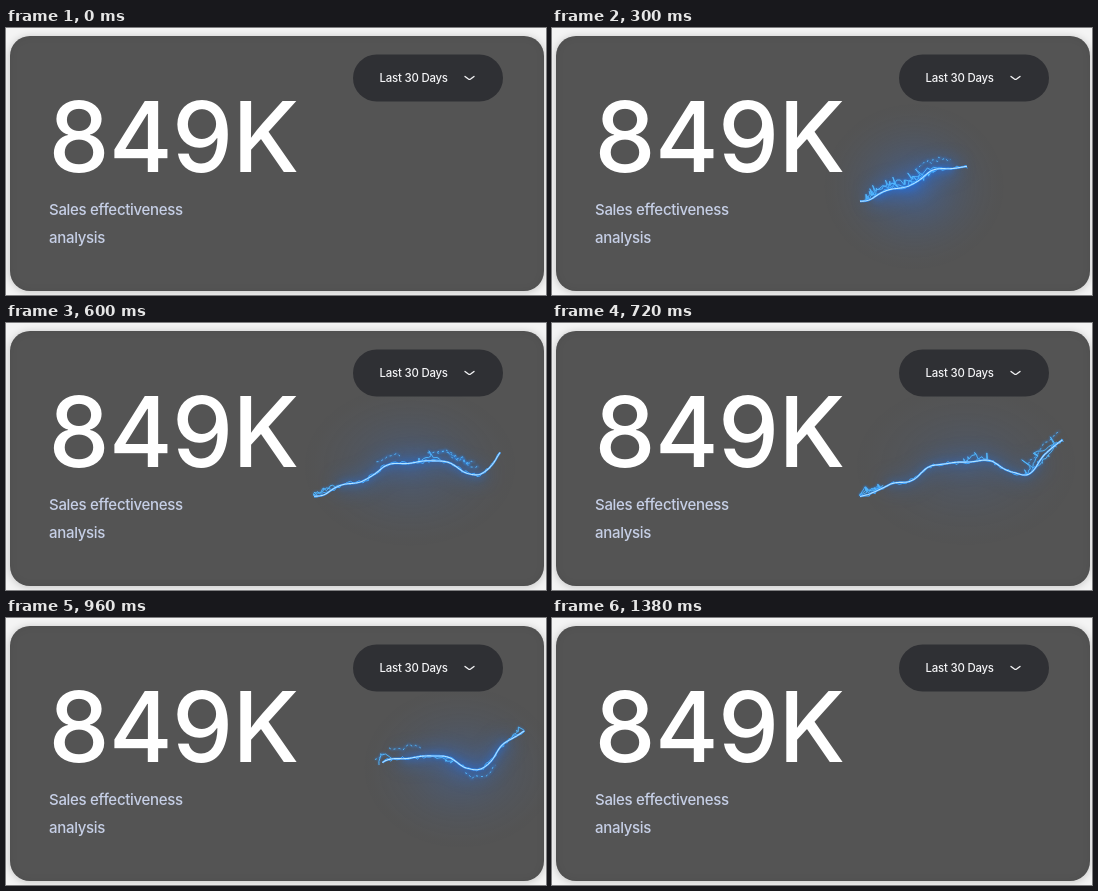
An HTML page with a canvas for the animation above (1800 ms loop, 540x267 px).

```html
<!DOCTYPE html>
<html lang="en">
<head>
<meta charset="utf-8">
<title>Sales effectiveness</title>
<style>
  html, body { margin: 0; width: 100%; height: 100%; overflow: hidden; background: #f4f4f4; }
  .stage { position: relative; width: 540px; height: 267px; overflow: hidden; }
  .card {
    position: absolute; left: 3.5px; top: 8px; width: 534px; height: 255px;
    border-radius: 20px; background: #545454; overflow: hidden;
    box-shadow: 0 1px 8px rgba(0, 0, 0, .2), inset 0 0 8px rgba(0, 0, 0, .07);
  }
  canvas { position: absolute; left: -3.5px; top: -8px; }
  svg { position: absolute; inset: 0; font: 500 15px Inter, sans-serif; }
  .total { font-size: 97px; letter-spacing: -.6px; fill: #fff; }
  .label { letter-spacing: -.3px; fill: #c6cfe6; }
  .range { font-size: 11.4px; letter-spacing: -.2px; fill: #f4f4f6; }
</style>
</head>
<body>
<div class="stage">
  <div class="card"><canvas width="540" height="267"></canvas></div>
  <svg width="540" height="267" viewBox="0 0 540 267">
    <rect x="347" y="26.5" width="150" height="47" rx="23.5" fill="#2f3034"/>
    <text class="range" x="373.5" y="54">Last 30 Days</text>
    <path d="M459 48.4L462.4 51Q463.5 51.8 464.6 51L468 48.4" fill="none" stroke="#f4f4f6" stroke-width="1.3" stroke-linecap="round"/>
    <text class="total" x="42.5" y="143.5">849K</text>
    <text class="label" x="43" y="187">Sales effectiveness</text>
    <text class="label" x="43" y="215">analysis</text>
  </svg>
</div>
<script>
const LOOP = 1800, STEP = 30, END = 1380;
const ARC_EVERY = 30, ARC_LIFE = 210;
const ctx = document.querySelector('canvas').getContext('2d');

// key points of the chart line
const keys = [[308, 173], [319, 171], [338, 161], [357, 158.5], [380, 143], [410, 139.5],
  [437, 138], [462, 150], [477, 150.5], [499, 125], [519, 113]];
const line = sampleCurve(keys);
const total = line[line.length - 1].s;

function sampleCurve(p) {
  const last = p.length - 1, out = [];
  const slope = i => {
    const a = p[Math.max(i - 1, 0)], b = p[Math.min(i + 1, last)];
    return (b[1] - a[1]) / (b[0] - a[0]);
  };
  let s = 0;
  for (let i = 0; i < last; i++) {
    const [x0, y0] = p[i], [x1, y1] = p[i + 1], w = x1 - x0;
    for (let x = x0; x < x1; x += .5) {
      const u = (x - x0) / w, v = 1 - u;
      const y = v * v * ((1 + 2 * u) * y0 + u * w * slope(i)) +
                u * u * ((3 - 2 * u) * y1 - v * w * slope(i + 1));
      const prev = out[out.length - 1];
      if (prev) s += Math.hypot(x - prev.x, y - prev.y);
      out.push({ x, y, s });
    }
  }
  return out;
}

// point at distance s along the line, moved sideways by `lift`
function at(s, lift = 0) {
  let i = line.findIndex(p => p.s >= s);
  if (i < 0) i = line.length - 1;
  const p = line[i], a = line[Math.max(i - 2, 0)], b = line[Math.min(i + 2, line.length - 1)];
  const dx = b.x - a.x, dy = b.y - a.y, len = Math.hypot(dx, dy);
  return [p.x + dy / len * lift, p.y - dx / len * lift];
}

function random(seed) {
  let s = Math.imul(seed + 1, 2654435761);
  return () => {
    s = (s + 0x6D2B79F5) | 0;
    let r = Math.imul(s ^ s >>> 15, s | 1);
    r ^= r + Math.imul(r ^ r >>> 7, r | 61);
    return ((r ^ r >>> 14) >>> 0) / 4294967296;
  };
}

const clamp = u => Math.min(1, Math.max(0, u));
const headAt = t => total * Math.sin(Math.PI / 2 * clamp((t - 30) / 840));
const tailAt = t => total * clamp((t - 755) / 645);

function trace(from, to, step, lift) {
  const path = new Path2D();
  for (let s = from; s < to; s += step) path.lineTo(...at(s, lift(s)));
  path.lineTo(...at(to, lift(to)));
  return path;
}

function stroke(path, color, width, blur = 0, dash = []) {
  ctx.filter = blur ? `blur(${blur}px)` : 'none';
  ctx.strokeStyle = color;
  ctx.lineWidth = width;
  ctx.setLineDash(dash);
  ctx.stroke(path);
}

function drawGlow(tail, head, power) {
  const len = head - tail, [x, y] = at((tail + head) / 2);
  const halo = ctx.createRadialGradient(0, 0, 0, 0, 0, 85);
  for (let u = 0; u <= 1; u += .125) {
    halo.addColorStop(u, `rgba(45,115,230,${.42 * power * (1 - u) ** 2})`);
  }
  ctx.save();
  ctx.filter = 'none';
  ctx.translate(x, y + 3);
  ctx.scale(.8 + len / 400, 1);
  ctx.fillStyle = halo;
  ctx.fillRect(-90, -90, 180, 180);
  ctx.restore();

  const inset = len * .14;
  const middle = trace(tail + inset, head - inset, 2, () => 0);
  stroke(middle, `rgba(35,115,240,${.42 * power})`, 14, 9);
  stroke(middle, `rgba(25,120,255,${.6 * power})`, 5, 3.5);
}

// one discharge: born at a random spot on the visible line, it flickers for a short life
function drawArc(born, t, tail, head) {
  const own = random(born), rnd = random(born * 7 + t);
  const tailBorn = tailAt(born), headBorn = headAt(born);
  const mid = tailBorn + own() * (headBorn - tailBorn);
  const reach = 9 + own() * 14;
  const side = own() < .72 ? 1 : -.6;
  const tall = side * (6 + own() * 9);
  const floating = own() < .25;
  const from = Math.max(tail - 4, mid - reach), to = Math.min(head + 2, mid + reach);
  if (to - from < 4) return;

  const path = new Path2D();
  for (let s = from; s < to; s += 1.2 + rnd() * 3) {
    const swell = Math.sin(Math.PI * (s - from) / (to - from));
    const lift = tall * (floating ? .6 + rnd() * .5 : swell * (.15 + .55 * rnd()));
    path.lineTo(...at(s, lift));
    if (!floating && rnd() < .2) {
      path.lineTo(...at(s + rnd() * 3 - 1.5, lift + tall * .7 * rnd()));
      path.lineTo(...at(s + 1, lift));
    }
  }
  stroke(path, 'rgba(40,140,255,.35)', 2, 1.2);
  stroke(path, '#55bcff', .9, 0, floating ? [2, 3] : []);
}

function drawBolt(t) {
  ctx.clearRect(0, 0, 540, 267);
  if (t < STEP || t >= END) return;
  const tail = tailAt(t), head = Math.max(headAt(t), 4);
  const power = .7 + .3 * Math.cos(2 * Math.PI * (t - 350) / 820);
  const rnd = random(t);
  const phase = rnd() * 6;
  const main = trace(tail, head, 1, s => .6 * Math.sin(s / 5 + phase));
  const strand = trace(tail, head, 3, () => (rnd() - .5) * 4);

  ctx.lineCap = ctx.lineJoin = 'round';
  drawGlow(tail, head, power);

  ctx.lineCap = 'butt';
  for (let born = t; born > Math.max(0, t - ARC_LIFE); born -= ARC_EVERY) drawArc(born, t, tail, head);

  stroke(strand, '#46abff', 1);
  stroke(main, 'rgba(45,145,255,.85)', 2.2, .6);
  stroke(main, '#b4e4ff', 1.1);
}

function frame(now) {
  drawBolt(Math.floor(now % LOOP / STEP) * STEP);
  requestAnimationFrame(frame);
}
requestAnimationFrame(frame);
</script>
</body>
</html>
```
